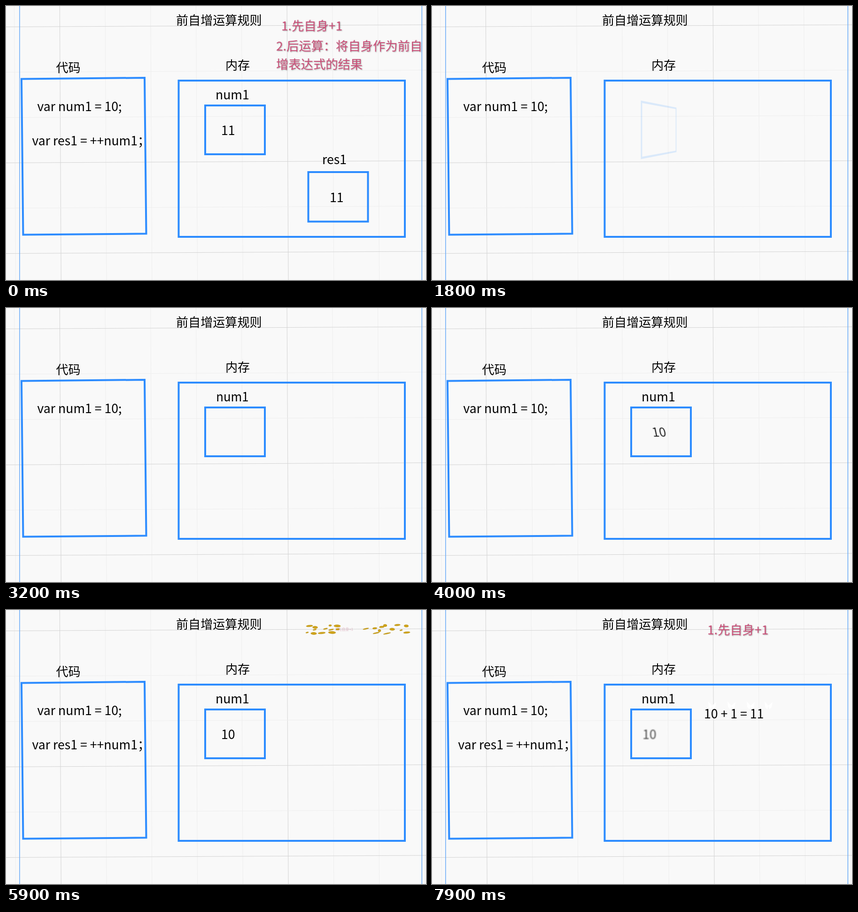
These frames come from a looping animation (894 by 584 pixels, 8 s). An HTML page:

```html
<!DOCTYPE html>
<html lang="zh-CN">
<head>
<meta charset="utf-8">
<title>前自增运算规则</title>
<style>
html, body { margin: 0; width: 100%; height: 100%; overflow: hidden; background: #f9f9f9; }
svg { position: absolute; left: 0; top: 0; }
text { font: 26.6px "Noto Sans CJK SC", "Noto Sans CJK", sans-serif; white-space: pre; }
.cjk { font-size: 26.1px; }
.rule { font-size: 26.3px; fill: #cb5079; filter: drop-shadow(1px 1.5px 1px rgba(0,0,0,.35)); }
svg text, svg .fx { transform-box: fill-box; transform-origin: center; }
.box { fill: none; stroke: #2d8cff; stroke-width: 4; }
#cell { position: absolute; left: 422px; top: 210px; width: 131px; height: 108px;
  box-sizing: border-box; border: 4px solid #2d8cff; }
</style>
</head>
<body>
<svg width="894" height="584">
  <g id="grid"></g>
  <path d="M29 0V584M885.3 0V584" stroke="#69aaf7" stroke-width="1.5"/>
  <path class="box" d="M33 155.5L295 153L298.5 485.3L36.5 487.5Z"/>
  <path class="box" d="M367.5 159H849V492H367.5Z"/>
  <path class="box" id="resCell" d="M643.5 354H770.5V459.5H643.5Z"/>
</svg>
<div id="cell"></div>
<svg width="894" height="584">
  <text class="cjk" x="362" y="39.5">前自增运算规则</text>
  <text class="cjk" x="106.5" y="140.5">代码</text>
  <text class="cjk" x="467" y="135.5">内存</text>
  <text id="line1" x="66.5" y="223.5">var num1 = 10;</text>
  <text id="line2" x="55.5" y="296.5">var res1 = ++num1；</text>
  <text id="label" x="446" y="198.7">num1</text>
  <text id="ten" x="458" y="274.5">10</text>
  <text id="tenOut" x="458" y="274.5">10</text>
  <text id="eleven" x="458" y="274.5">11</text>
  <text id="resLabel" x="673" y="336.7">res1</text>
  <text id="resValue" x="689" y="417.5">11</text>
  <text id="sum" x="579" y="231.3">10 + 1 = 11</text>
  <g id="wings" class="fx" fill="#fff"></g>
  <g id="gold" class="fx" fill="#d0a419" stroke="#b78e13" stroke-width=".7"></g>
  <text id="rule1" class="rule" x="586" y="52">1.先自身+1</text>
  <g id="rule2">
    <text class="rule" x="575" y="95">2.后运算：将自身作为前自</text>
    <text class="rule" x="575" y="134">增表达式的结果</text>
  </g>
</svg>
<script>
const LOOP = 8000, STEP = 100, INTRO = 1000;
const $ = id => document.getElementById(id);

function line(x1, y1, x2, y2, major) {
  return `<path d="M${x1} ${y1}L${x2} ${y2}" stroke="${major ? '#d3d3d3' : '#eeeeee'}"/>`;
}
let grid = '';
for (let i = -1; i < 9; i++) {
  const x = 114.3 + 96.75 * i;
  grid += line(x, 0, x + 3, 584, i === 0 || i === 5);
}
for (let i = 0; i < 6; i++) {
  const y = 44.5 + 96.6 * i;
  grid += line(0, y, 894, y - 4.5, i % 5 === 0 || i === 3);
}
$('grid').innerHTML = grid;

const flakes = [[641,48],[646,34],[658,37],[657,42],[672,49],[655,50],[680,40],[690,33],
  [705,34],[692,42],[706,41],[694,48],[766,40],[785,39],[795,44],[788,49],[800,36],[807,33],
  [811,50],[833,32],[852,34],[841,43],[853,48],[822,41]];
$('gold').innerHTML = flakes.map(([x, y], i) =>
  `<ellipse cx="${x}" cy="${y}" rx="${3 + i * 5 % 7 * .8}" ry="${1 + i % 3 * .7}" transform="rotate(${i * 7 % 21 - 12} ${x} ${y})"/>`).join('');

$('wings').innerHTML = [596, 637, 678, 716].map(x =>
  `<path d="M${x} 204l-8 -9l1 12l5 5zm0 0l9 -8l-2 11l-5 5z"/>`).join('');

const out = 'cubic-bezier(.215,.61,.355,1)';
const pose = (offset, transform, more) => ({ offset, transform, ...more });
const move = (offset, x, more) => pose(offset, `translateX(${x}px)`, more);
const turn = (offset, deg, more) => pose(offset, `perspective(400px) rotateY(${deg}deg)`, more);
const slant = (offset, x, deg, more) => pose(offset, `translateX(${x}px) skewX(${deg}deg)`, more);

const bounceLeft = [move(0, -3000, { opacity: 0 }), move(.6, 25, { opacity: 1 }),
  move(.75, -10), move(.9, 5), move(1, 0)];
const flip = [turn(0, 90, { opacity: 0 }), turn(.4, -20), turn(.6, 10, { opacity: 1 }),
  turn(.8, -5), turn(1, 0)];
const rubber = [[0, 1, 1], [.3, 1.25, .75], [.4, .75, 1.25], [.5, 1.15, .85],
  [.65, .95, 1.05], [.75, 1.05, .95], [1, 1, 1]].map(([o, x, y]) => pose(o, `scale(${x},${y})`));
const speedIn = [slant(0, 65, -30, { opacity: 0 }), slant(.6, 0, 20, { opacity: 1 }),
  slant(.8, 0, -5), slant(1, 0, 0)];
const blurOut = [move(0, 0, { opacity: 1, filter: 'blur(0px)' }),
  move(1, -33, { opacity: 0, filter: 'blur(3.5px)' })];
const gather = [pose(0, 'translateX(98px) scale(0)', { opacity: 0 }),
  pose(1, 'translateX(0px) scale(1)', { opacity: 1 })];
const drift = [pose(0, 'translateX(0px) scaleX(.85)', { opacity: 0 }),
  pose(.15, 'translateX(0px) scaleX(.95)', { opacity: 1 }),
  pose(.3, 'translateX(0px) scaleX(1)', { opacity: 1 }),
  pose(1, 'translateX(-70px) scaleX(1)', { opacity: 0 })];
const fade = [{ opacity: 0 }, { opacity: 1 }];

// id, start, frames, easing, shown from, shown until, shown in intro
const actors = [
  ['line1', 650, bounceLeft, out, 1400, LOOP, true],
  ['cell', 1600, flip, 'ease-in', 1600, LOOP, true],
  ['label', 2600, rubber, 'ease', 2600, LOOP, true],
  ['ten', 3600, speedIn, 'ease-out', 3600, 7600],
  ['line2', 4593, bounceLeft, out, 4600, LOOP, true],
  ['gold', 5600, drift, 'linear', 5600, 6600],
  ['rule1', 5600, gather, 'linear', 5600, LOOP, true],
  ['sum', 6600, fade, 'ease-out', 6600, LOOP],
  ['wings', 6600, fade, 'linear', 6600, LOOP],
  ['tenOut', 7600, blurOut, 'linear', 7600, LOOP],
  ...['eleven', 'resCell', 'resLabel', 'resValue', 'rule2'].map(id => [id, 0, null, '', LOOP, LOOP, true])
].map(([id, start, frames, easing, from, until, intro]) => {
  const el = $(id);
  const anim = frames && el.animate(frames.map(f => ({ ...f, easing })),
    { duration: 1000, delay: start, fill: 'both' });
  if (anim) anim.pause();
  return { el, anim, from, until, intro };
});

function draw(now) {
  const t = Math.floor(now % LOOP / STEP) * STEP;
  for (const { el, anim, from, until, intro } of actors) {
    const shown = t < INTRO ? intro : t >= from && t < until;
    el.style.visibility = shown ? 'visible' : 'hidden';
    if (anim) anim.currentTime = t < INTRO ? LOOP + 1000 : t;
  }
}
function tick() {
  draw(performance.now());
  requestAnimationFrame(tick);
}
tick();
</script>
</body>
</html>
```
